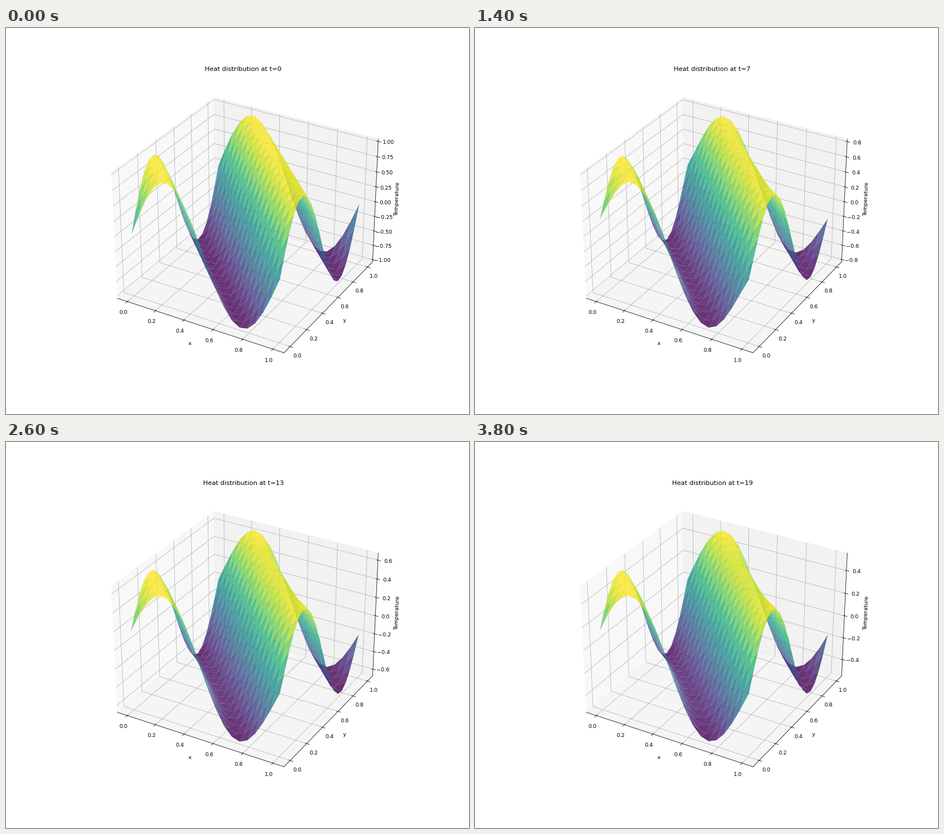
A matplotlib script for the animation above (4000 ms loop, 820 by 683 pixels).

```python
import numpy as np
import matplotlib.pyplot as plt
from matplotlib.animation import FuncAnimation

FRAMES = 20
N = 20
DPI = 820 / 12
RATE = 5e-4 * (N - 1) ** 2  # diffusivity * dt / dx^2

axis = np.linspace(0, 1, N)
X, Y = np.meshgrid(axis, axis)


def step(u):
    """One explicit heat step on a wrapped grid."""
    around = sum(np.roll(u, d, axis=a) for d in (-1, 1) for a in (0, 1))
    return u + RATE * (around - 4 * u)


states = [np.sin(2 * np.pi * (X + Y))]
while len(states) < FRAMES:
    states.append(step(states[-1]))

fig = plt.figure(figsize=(820 / DPI, 683 / DPI), dpi=DPI)
ax = fig.add_subplot(111, projection="3d")


def draw(i):
    ax.clear()
    ax.plot_surface(X, Y, states[i], cmap="viridis", alpha=0.8)
    ax.set_title(f"Heat distribution at t={i}")
    ax.set_xlabel("x")
    ax.set_ylabel("y")
    ax.set_zlabel("Temperature")
    return []


anim = FuncAnimation(fig, draw, frames=FRAMES, init_func=lambda: [],
                     interval=200, repeat=True, repeat_delay=0)
plt.show()
```
